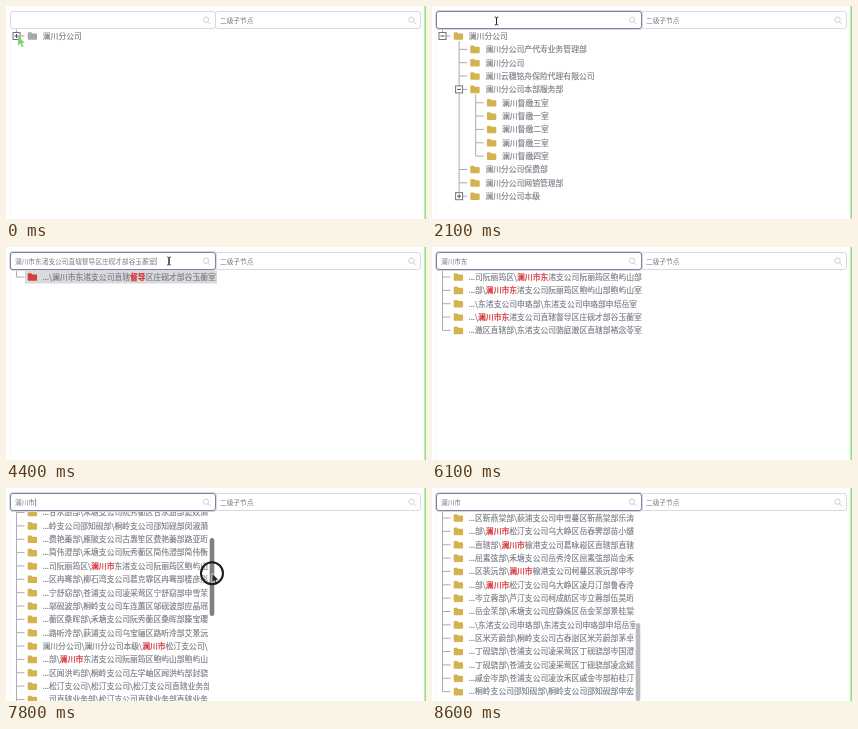
Recreate the animation shown at these times as an HTML page. Size 420 px wide and 213 px high, loop 8.7 s.

```html
<!DOCTYPE html>
<html lang="zh-CN">
<head>
<meta charset="utf-8">
<title>树形搜索</title>
<style>
html, body { margin: 0; width: 100%; height: 100%; overflow: hidden; background: #fff; }
svg { display: block; width: 100vw; height: 100vh; }
text { font-family: "Noto Sans CJK SC", "Noto Sans CJK", sans-serif; fill: #777a83; white-space: pre; }
#list text { stroke: #777a83; stroke-width: .14; }
#list .hi { fill: #d6353a; stroke: #d6353a; stroke-width: .25; }
.line { stroke: #a9acb4; stroke-width: 1; fill: none; }
</style>
</head>
<body>
<svg viewBox="0 0 420 213">
  <defs><clipPath id="view"><rect id="clip" x="0" y="23.5" width="211" height="190"/></clipPath></defs>
  <rect width="420" height="213" fill="#fff"/>
  <path d="M4.5 27V213" stroke="#f6f6f8"/>
  <rect x="418.4" width="1.6" height="213" fill="#93df80"/>
  <g clip-path="url(#view)"><g id="list"></g></g>
  <g id="bar"></g>
  <g id="inputs"></g>
  <g id="mouse"></g>
</svg>
<script>
const LOOP = 8700, STEP = 13.35, TOP = 30;
const PICKED = '澜川市东渚支公司直辖督导区庄砚才部谷玉蘅室';
const QUERY = '澜川市东';

// [label, depth, box sign]
const ROOT = ['澜川分公司', 0, '-'];
const HEAD = ['澜川分公司产代寿业务管理部', '澜川分公司', '澜川云穗铭舟保险代理有限公司'].map(s => [s, 1, '']);
const ROOMS = [...'五一二三四'].map(c => [`澜川督缴${c}室`, 2, '']);
const TAIL = [['澜川分公司保费部', 1, ''], ['澜川分公司网销管理部', 1, ''], ['澜川分公司本级', 1, '+']];

const GUIDED = ['谷玉蘅', '简伟衡', '柯燕汀', '路亚珩', '席玉澄']
  .map(n => `\\澜川市东渚支公司直辖督导区庄砚才部${n}室`);

const FIVE = String.raw`司阮丽筠区\澜川市东渚支公司阮丽筠区鲍屿山部
部\澜川市东渚支公司阮丽筠区鲍屿山部鲍屿山室
\东渚支公司申珞部\东渚支公司申珞部申培岳室
\澜川市东渚支公司直辖督导区庄砚才部谷玉蘅室
澈区直辖部\东渚支公司骆庭澈区直辖部褚念苓室`.split('\n');

const MANY = String.raw`纪闻舟部\苍浦支公司凌汝禾区纪闻舟部祁书岚
澈区直辖部\东渚支公司骆庭澈区直辖部褚念苓
岭支公司邵知砚部\桐岭支公司邵知砚部霍春萤
桐岭支公司温映芷部\桐岭支公司温映芷部直辖
竺区岑菡部\禾塘支公司卫文竺区岑菡部柯燕汀
甘永澍部\禾塘支公司阮秀蘅区甘永澍部窦姣漪
岭支公司邵知砚部\桐岭支公司邵知砚部闵淑漪
费艳蓁部\雁陂支公司古惠笙区费艳蓁部路亚珩
简伟澄部\禾塘支公司阮秀蘅区简伟澄部简伟衡
司阮丽筠区\澜川市东渚支公司阮丽筠区鲍屿山
区冉骞部\柳石湾支公司葛克霏区冉骞部楼彦彤
宁舒窈部\苍浦支公司凌采莺区宁舒窈部申雪茉
邬砚波部\桐岭支公司车连蕙区邬砚波部应晶瑶
蘅区桑晖部\禾塘支公司阮秀蘅区桑晖部滕宝璎
路听泠部\荻浦支公司乌宝骊区路听泠部艾景沅
澜川分公司\澜川分公司本级\澜川市松汀支公司\
部\澜川市东渚支公司阮丽筠区鲍屿山部鲍屿山
区闻洪屿部\桐岭支公司左学岫区闻洪屿部封骁
松汀支公司\松汀支公司\松汀支公司直辖业务部
司直辖业务部\松汀支公司直辖业务部直辖业务
区丁砚骁部\苍浦支公司凌采莺区丁砚骁部米芳
笙区直辖部\桐岭支公司古宝笙区直辖部席玉澄
公司葛咏崧区\澜川市榆港支公司葛咏崧区直辖
区靳燕棠部\荻浦支公司申雪蔓区靳燕棠部乐涛
部\澜川市松汀支公司乌大峥区岳春霁部苗小燧
直辖部\澜川市榆港支公司葛咏崧区直辖部直辖
屈素弦部\禾塘支公司岳秀泠区屈素弦部尚金禾
区裴沅部\澜川市榆港支公司柯蔓区裴沅部申岑
部\澜川市松汀支公司乌大峥区凌月汀部鲁春泠
岑立蓉部\芦汀支公司柯成舫区岑立蓉部伍昊珩
岳金茉部\禾塘支公司应静姝区岳金茉部景桂棠
\东渚支公司申珞部\东渚支公司申珞部申培岳室
区米芳蔚部\桐岭支公司古春澍区米芳蔚部茅卓
丁砚骁部\苍浦支公司凌采莺区丁砚骁部岑国澄
丁砚骁部\苍浦支公司凌采莺区丁砚骁部凌念媱
戚金岑部\苍浦支公司凌汝禾区戚金岑部柏桂汀
桐岭支公司邵知砚部\桐岭支公司邵知砚部申宏`.split('\n');

const $ = id => document.getElementById(id);
const cache = {};
function put(id, html) {
  if (cache[id] !== html) $(id).innerHTML = cache[id] = html;
}

// Piecewise linear track: keys are [time, ...values]
function track(t, keys) {
  let i = keys.findIndex(k => k[0] > t);
  if (i < 0) return keys[keys.length - 1].slice(1);
  if (!i) return keys[0].slice(1);
  const a = keys[i - 1], b = keys[i], p = (t - a[0]) / (b[0] - a[0]);
  return a.slice(1).map((v, j) => v + (b[j + 1] - v) * p);
}

const rowY = i => TOP + i * STEP;
const text = (x, y, size, s) => `<text x="${x}" y="${(y + size * 0.37).toFixed(2)}" font-size="${size}">${s}</text>`;
const line = d => `<path class="line" d="${d}"/>`;
const folder = (x, y, fill = '#d3b350') =>
  `<path transform="translate(${x} ${y})" fill="${fill}" d="M-4.8-2.8q0-1 1-1h2.5l1.2 1.2h3.7q1 0 1 1v4.4q0 1-1 1h-7.4q-1 0-1-1z"/>`;
const box = (x, y, sign) =>
  `<rect x="${x - 3.5}" y="${y - 3.5}" width="7" height="7" fill="#fff" stroke="#70737c"/>` +
  `<path d="M${x - 2} ${y}h4${sign === '+' ? `M${x} ${y - 2}v4` : ''}" stroke="#50535c"/>`;

function treeSvg(rows, tint) {
  let out = line('M10.5 23V30');
  const last = d => rows.reduce((m, r, i) => r[1] === d ? i : m, -1);
  const first = d => rows.findIndex(r => r[1] === d);
  for (const d of [1, 2])
    if (last(d) > 0) out += line(`M${10.5 + d * 16.6} ${rowY(first(d) - 1) + 5}V${rowY(last(d))}`);
  rows.forEach(([label, d, sign], i) => {
    const x = 10.5 + d * 16.6, y = rowY(i);
    out += line(`M${x} ${y}h8`) + folder(x + 16, y, tint) + text(x + 26.3, y, 7.8, label);
    if (sign) out += box(x, y, sign);
  });
  return out;
}

function listSvg(rows, word, { hover = -1, picked = false, scroll = 0, width = 192 }) {
  let out = line(`M10.5 23V${rowY(rows.length - 1) - scroll}`);
  rows.forEach((s, i) => {
    const y = rowY(i) - scroll;
    if (y < 12 || y > 225) return;
    if (picked || i === hover)
      out += `<rect x="19" y="${y - 6.5}" width="${width}" height="13" fill="${picked ? '#d9dadd' : '#f4f5f7'}"/>`;
    const label = (s.startsWith('澜川分') ? '' : '...') + s;
    out += line(`M10.5 ${y}h8`) + folder(26.5, y, picked ? '#d23f3f' : undefined) +
      text(36.5, y, 7.8, label.replace(word, `<tspan class="hi"${picked ? ' font-weight="700"' : ''}>${word}</tspan>`));
  });
  return out;
}

function typed(t) {
  if (t < 2500) return '';
  if (t < 3100) return 'du dao'.slice(0, 1 + (t - 2500) / 100);
  if (t < 4100) return '督导';
  if (t < 6400) return PICKED.slice(0, Math.max(4, 21 - Math.max(0, Math.floor((t - 4400) / 88))));
  return QUERY.slice(0, 3);
}

const PATH = [[0, 12, 30], [400, 12, 30], [700, 140, 66], [1100, 27, 84], [1300, 27, 84],
  [2100, 64.5, 15], [3500, 64.5, 15], [3900, 163, 30], [4100, 163, 30], [4300, 163, 14],
  [6500, 163, 14], [7100, 154, 59.5], [7200, 154, 59.5], [7500, 206, 58], [8100, 206, 112.5], [8500, 206, 175]];

const scrollAt = t => track(t, [[7500, 0], [8100, 144.4], [8500, 307]])[0];

function drawList(t, my) {
  const s = typed(t);
  const hover = t >= 3500 && t < 4100 || t >= 6700 && t < 7400 ? Math.round((my - TOP) / STEP) : -1;
  $('clip').setAttribute('width', t >= 6600 ? 203 : 211);
  if (t < 2800) {
    const rows = [[ROOT[0], 0, t < 300 ? '+' : '-']];
    if (t >= 300) {
      const open = t >= 1200;
      rows.push(...HEAD, ['澜川分公司本部服务部', 1, open ? '-' : '+'], ...(open ? ROOMS : []), ...TAIL);
    }
    return treeSvg(rows, t < 200 ? '#a6a8b0' : undefined);
  }
  if (t < 3200) return '';
  if (t < 4100) return listSvg(GUIDED, '督导', { hover });
  if (t < 4500) return listSvg(['\\' + PICKED], '督导', { picked: true });
  if (t < 5900) return listSvg(['\\' + PICKED], s, {});
  if (t < 6600) return listSvg(FIVE, QUERY, {});
  return listSvg(MANY, QUERY.slice(0, 3), { hover, scroll: scrollAt(t), width: 184 });
}

function drawBar(t) {
  if (t < 6600) return '';
  const size = 78, y = 24 + scrollAt(t) / 307 * (189 - size);
  const fill = t >= 7500 && t < 8500 ? '#7f8083' : '#bcbdc0';
  return `<rect x="203.7" y="${y}" width="4.6" height="${size}" rx="2.3" fill="${fill}"/>`;
}

const lens = x => `<g fill="none" stroke="#c6c9d0" stroke-width=".9"><circle cx="${x}" cy="13.7" r="2.7"/><path d="M${x + 2} 15.7l2.3 2.3"/></g>`;
const field = (x, stroke) => `<rect x="${x}" y="5.5" width="205" height="17" rx="2.5" fill="#fff" stroke="${stroke}"/>`;

function drawInputs(t) {
  const s = typed(t), focus = t >= 1900;
  const caret = t >= 2500 && t < 3200 || t >= 4300 && t < 5900 || focus && (t - 270) % 1060 < 530;
  let out = field(209.5, '#d8dae0') + text(214, 14.5, 6.7, '二级子节点') + lens(405.5);
  if (focus) out += '<rect x="3.8" y="4.8" width="206.4" height="18.4" rx="3.2" fill="none" stroke="#d5d7e2" stroke-width="1.4"/>';
  out += field(4.5, focus ? '#80849a' : '#d8dae0') + lens(200) + text(9, 14.5, 6.7, s);
  if (caret) {
    const w = [...s].reduce((n, c) => n + (c === ' ' ? 1.5 : c < '~' ? 4 : 6.7), 0);
    out += `<path d="M${9.5 + w} 10.5v8" stroke="#666" stroke-width=".7"/>`;
  }
  return out;
}

const ARROW = 'M0 0V9.5L2.3 7.5L3.9 11L5.6 10.2L4 6.9H7Z';
const HAND = 'M-1 1q0-1.2 1-1.2t1 1.2v3.2q2.2-.3 2.5.7q2.2 0 2.2 1.2q1.2.3 1 1.6q-.2 2-1.3 3.6h-5.2q-1.3-2.3-3.2-4.2q.5-1.6 2 0z';
const IBEAM = 'M-1.8-4q1.8 0 1.8 1v6q0 1-1.8 1M1.8-4q-1.8 0-1.8 1v6q0 1 1.8 1';

function drawMouse(t, x, y) {
  if (t >= 2600 && t < 3500 || t >= 4500 && t < 6500 || t >= 8500) return '';
  const at = `transform="translate(${x.toFixed(1)} ${y.toFixed(1)})"`;
  let out;
  if (t < 200) out = `<path ${at} d="${ARROW}" fill="#7fd66b"/>`;
  else if (y < 23) out = `<path ${at} d="${IBEAM}" fill="none" stroke="#222" stroke-width=".9"/>`;
  else if (x > 203) out = `<path ${at} d="${ARROW}" fill="#222" stroke="#fff" stroke-width=".7"/>`;
  else out = `<path ${at} d="${HAND}" fill="#fff" stroke="#333" stroke-width=".9"/>`;
  const press = [[300, 400], [1200, 1300], [4000, 4100], [7500, 8500]].some(([a, b]) => t >= a && t < b);
  if (press) out += `<circle ${at} r="11" fill="none" stroke="#1c1c1c" stroke-width="2"/>`;
  return out;
}

function draw(ms) {
  const t = Math.floor(ms % LOOP / 100) * 100;
  const [mx, my] = track(t, PATH);
  put('list', drawList(t, my));
  put('bar', drawBar(t));
  put('inputs', drawInputs(t));
  put('mouse', drawMouse(t, mx, my));
}

const start = performance.now();
function tick() {
  draw(performance.now() - start);
  requestAnimationFrame(tick);
}
tick();
</script>
</body>
</html>
```
